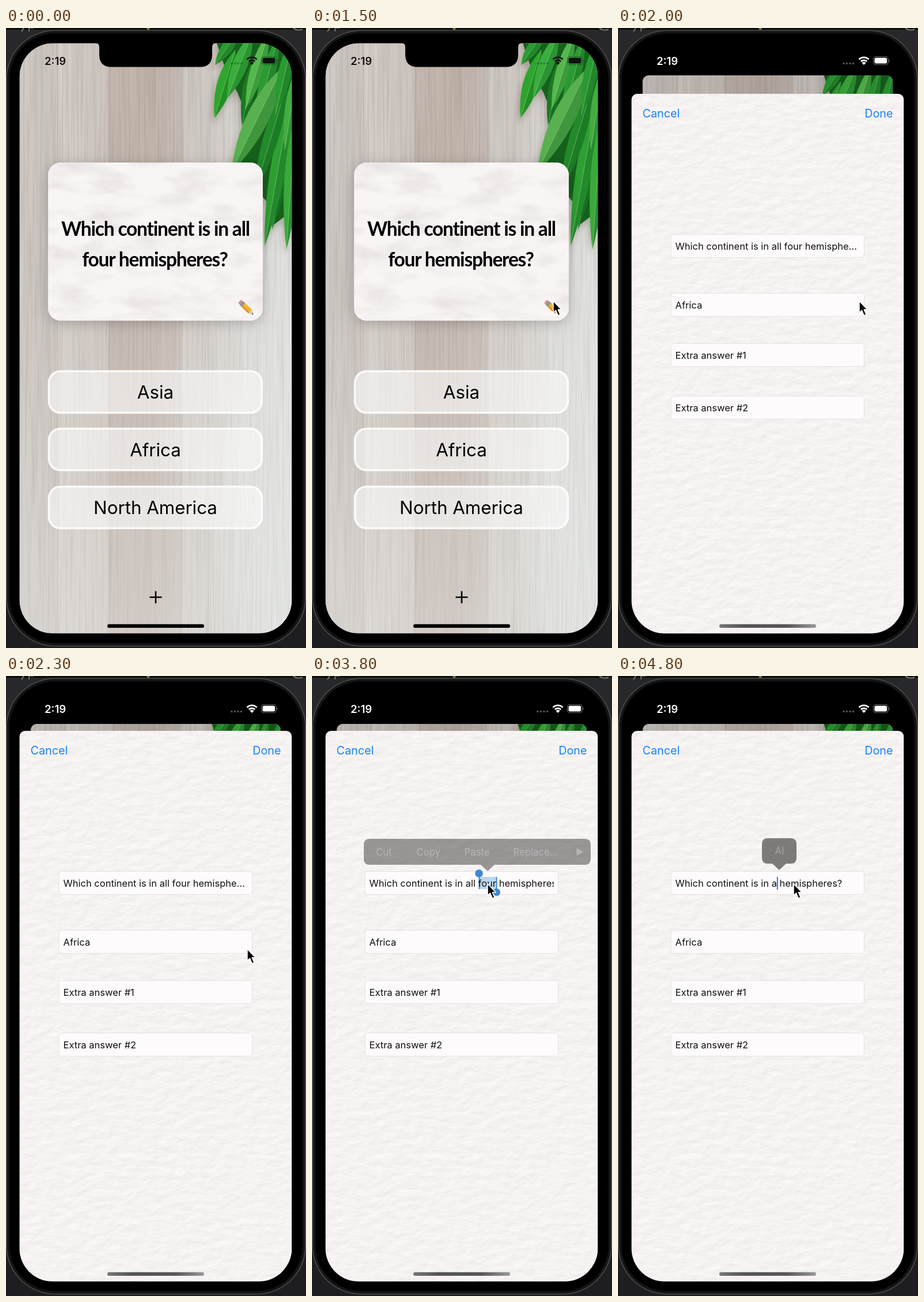
An HTML page that plays this animation: 521 by 1074 pixels, repeating every 5 s.

```html
<!DOCTYPE html>
<html lang="en">
<head>
<meta charset="utf-8">
<title>Flashcard app</title>
<style>
  html, body { margin: 0; width: 100%; height: 100%; overflow: hidden; background: #28282a; }
  svg { display: block; width: 100%; height: 100%; font-family: Inter, Roboto, sans-serif; }
  .question { font: 700 33.5px Lato, sans-serif; letter-spacing: -1.2px; text-anchor: middle; }
  .answer { font-size: 31.3px; text-anchor: middle; }
  .link { font-size: 19.8px; fill: #1a83f7; }
  .input { font-size: 16.5px; fill: #111; }
  .menu { font-size: 16.7px; fill: #fff; }
  .clock { font-size: 18.5px; font-weight: 600; }
</style>
</head>
<body>
<svg viewBox="0 0 521 1074" preserveAspectRatio="none">
  <defs>
    <clipPath id="glass"><rect x="23.3" y="26.3" width="473.2" height="1022.5" rx="57.5"/></clipPath>
    <clipPath id="homeClip"><rect id="homeShape" x="23.3" y="26.3" width="473.2" height="1022.5"/></clipPath>
    <clipPath id="sheetClip"><rect x="23.3" width="473.2" height="1100" rx="10"/></clipPath>
    <clipPath id="inputClip"><rect x="99" y="243" width="321" height="41"/></clipPath>
    <clipPath id="cardClip"><rect x="73" y="233" width="373" height="274" rx="22"/></clipPath>

    <linearGradient id="planks" gradientUnits="userSpaceOnUse" x1="23" x2="497" y1="0" y2="0">
      <stop offset="0" stop-color="#cfcbc7"/><stop offset=".13" stop-color="#cbc4bf"/>
      <stop offset=".15" stop-color="#d4cec9"/><stop offset=".325" stop-color="#cdc5bf"/>
      <stop offset=".33" stop-color="#c3b7af"/><stop offset=".48" stop-color="#c1b5ac"/>
      <stop offset=".592" stop-color="#c6bcb5"/><stop offset=".6" stop-color="#d0cac5"/>
      <stop offset=".7" stop-color="#d0cbc6"/><stop offset=".82" stop-color="#d9d8d5"/>
      <stop offset="1" stop-color="#dcdedc"/>
    </linearGradient>
    <linearGradient id="light" x1="0" y1="0" x2=".4" y2="1">
      <stop offset=".4" stop-color="#fff" stop-opacity="0"/>
      <stop offset="1" stop-color="#f4f8f7" stop-opacity=".35"/>
    </linearGradient>
    <linearGradient id="barTint">
      <stop offset="0" stop-color="#777"/><stop offset=".25" stop-color="#555"/>
      <stop offset=".7" stop-color="#595757"/><stop offset="1" stop-color="#999"/>
    </linearGradient>

    <filter id="grain" x="0" y="0" width="100%" height="100%" color-interpolation-filters="sRGB">
      <feTurbulence type="fractalNoise" baseFrequency=".3 .006" numOctaves="3" seed="4"/>
      <feColorMatrix values="0 0 0 0 .42  0 0 0 0 .36  0 0 0 0 .32  .35 0 0 0 -.13"/>
      <feComposite operator="over" in2="SourceGraphic"/>
    </filter>
    <filter id="marble" x="0" y="0" width="100%" height="100%" color-interpolation-filters="sRGB">
      <feTurbulence type="fractalNoise" baseFrequency=".014 .035" numOctaves="4" seed="9"/>
      <feColorMatrix values="0 0 0 0 .74  0 0 0 0 .71  0 0 0 0 .7  .6 0 0 0 -.25"/>
      <feComposite operator="over" in2="SourceGraphic"/>
    </filter>
    <filter id="paper" x="0" y="0" width="100%" height="100%" color-interpolation-filters="sRGB">
      <feTurbulence type="fractalNoise" baseFrequency=".045 .08" numOctaves="3" seed="2"/>
      <feDiffuseLighting surfaceScale=".28" diffuseConstant="1.155" lighting-color="#f6f2f2">
        <feDistantLight azimuth="240" elevation="60"/>
      </feDiffuseLighting>
    </filter>
    <filter id="shadow" x="-20%" y="-20%" width="140%" height="140%">
      <feDropShadow dx="0" dy="4" stdDeviation="11" flood-color="#000" flood-opacity=".22"/>
    </filter>
    <filter id="leafShadow" x="-20%" y="-20%" width="140%" height="140%">
      <feDropShadow dx="-3" dy="7" stdDeviation="6" flood-color="#3a2c20" flood-opacity=".3"/>
    </filter>
  </defs>

  <!-- desktop and phone body -->
  <rect width="521" height="1074" fill="#28282a"/>
  <rect y="965" width="521" height="109" fill="#1e1e20"/>
  <path d="M0 1.5H521" stroke="#0d0d0e" stroke-width="3"/>
  <path d="M27 6L32 -2M40 6V0H48" stroke="#8a8a8a" stroke-width="1.5" fill="none"/>
  <circle cx="247" cy="1" r="2.5" fill="#6f7d3c"/>
  <path d="M499 0Q506 6 515 2" stroke="#777" stroke-width="2" fill="none"/>
  <rect x="1" y="4.5" width="519" height="1066" rx="84" fill="#000" stroke="#48484a" stroke-width="2"/>
  <rect x="4" y="7.5" width="513" height="1060" rx="81" fill="none" stroke="#151516" stroke-width="4"/>

  <g clip-path="url(#glass)">
    <rect x="23" y="26" width="474" height="1023" fill="#000"/>
    <g id="home"><g clip-path="url(#homeClip)">
      <rect x="23" y="26" width="474" height="1023" fill="url(#planks)" filter="url(#grain)"/>
      <path d="M89.500 26V1049M180 26V1049M305.500 26V1049M351 500V1049" stroke="#8d8078" stroke-opacity=".25" stroke-width="1.500"/>
      <rect x="23" y="26" width="474" height="1023" fill="url(#light)"/>
      <g id="leaves" filter="url(#leafShadow)"></g>
      <g filter="url(#shadow)"><rect x="73" y="233" width="373" height="274" rx="22" fill="#f8f4f4"/></g>
      <g clip-path="url(#cardClip)"><rect x="73" y="233" width="373" height="274" fill="#f9f5f5" filter="url(#marble)"/></g>
      <text class="question" x="259.500" y="360">Which continent is in all</text>
      <text class="question" x="258.500" y="413">four hemispheres?</text>
      <g transform="translate(406 473) rotate(44)">
        <rect y="-3.500" width="5" height="8" rx="2" fill="#c98f8c"/>
        <rect x="4.500" y="-4" width="5" height="9" fill="#8f9494"/>
        <rect x="9.500" y="-4" width="16" height="9" fill="#f3b62d"/>
        <path d="M9.500 2H25.500V5H9.500Z" fill="#d9932a"/>
        <path d="M25.500 -4L33 .5L25.500 5Z" fill="#e3c8a0"/>
        <path d="M30.500 -1L33.500 .5L30.500 2Z" fill="#444"/>
      </g>
      <g id="answers"></g>
      <path d="M249.500 986H270.500M260 975.500V996.500" stroke="#000" stroke-width="2.600"/>
      <rect id="dim" x="23" y="26" width="474" height="1023"/>
    </g></g>

    <g id="sheet"><g clip-path="url(#sheetClip)">
      <rect x="23" width="474" height="960" fill="#f5f1f1" filter="url(#paper)"/>
      <text class="link" x="42.500" y="41">Cancel</text>
      <text class="link" x="477.500" y="41" text-anchor="end">Done</text>
      <g id="inputs"></g>
      <g id="selection">
        <rect x="290" y="253" width="31" height="21" fill="#bcd6ef"/>
        <path d="M290.500 249V274M320.500 253V279" stroke="#3f88d8" stroke-width="2"/>
        <circle cx="290" cy="247" r="6.800" fill="#3f88d8"/>
        <circle cx="320.500" cy="279.500" r="6.500" fill="#3f88d8"/>
      </g>
      <g clip-path="url(#inputClip)"><text id="typed" class="input" x="99.500" y="269.500"></text></g>
      <rect id="caret" y="253" width="2.200" height="22" fill="#3f88d8"/>
      <g id="menu">
        <path d="M100 187H474Q484 187 484 197V222Q484 232 474 232H317L305 243L293 232H100Q90 232 90 222V197Q90 187 100 187Z" fill="#2e2c2b"/>
        <g id="menuText" class="menu">
          <text x="111" y="215.500">Cut</text><text x="181.500" y="215.500">Copy</text>
          <text x="264.500" y="215.500">Paste</text><text x="349.500" y="215.500">Replace...</text>
          <path d="M459.500 203L471 209.500L459.500 216Z"/>
        </g>
      </g>
      <g id="hint">
        <path d="M260 186H300Q310 186 310 196V220Q310 230 300 230H292L280 241L268 230H260Q250 230 250 220V196Q250 186 260 186Z" fill="#2e2c2b" opacity=".6"/>
        <text class="menu" x="280.500" y="214" text-anchor="middle" opacity=".32">AI</text>
      </g>
    </g></g>
  </g>

  <path d="M156 26Q162 26.500 162 33V46Q162 67.500 183 67.500H337Q358 67.500 358 46V33Q358 26.500 364 26V24H156Z"/>
  <g id="status">
    <text class="clock" x="67" y="63.500">2:19</text>
    <g id="dots" opacity=".35"></g>
    <path d="M418.500 54.500A12 12 0 0 1 435.500 54.500M421.800 58A7.500 7.500 0 0 1 432.200 58" fill="none" stroke="currentColor" stroke-width="2.800"/>
    <path d="M427 64L423.500 60.300A5 5 0 0 1 430.500 60.300Z"/>
    <rect x="443.500" y="49.500" width="25.500" height="14" rx="4" fill="none" stroke="currentColor" stroke-opacity=".4" stroke-width="1.200"/>
    <rect x="445.500" y="51.500" width="21.500" height="10" rx="2.500"/>
    <path d="M470.500 54Q473 56.500 470.500 59Z" opacity=".5"/>
  </g>
  <rect id="bar" x="176" y="1032.800" width="168" height="6.200" rx="3.100"/>
  <path id="cursor" d="M0 0V20L4.500 16L8.200 25L12 23.400L8.300 14.800H14.200Z" stroke="#fff" stroke-width="1.500" stroke-linejoin="round"/>
</svg>
<script>
const LOOP = 5000;
const el = id => document.getElementById(id);
const show = (id, on) => el(id).setAttribute('display', on ? 'inline' : 'none');
const set = (id, name, value) => el(id).setAttribute(name, value);

// Latest entry whose start time has passed; motion holds between steps.
const pick = (steps, t) => steps.filter(s => s[0] <= t).pop();

// A blade from base to tip, bulging sideways, with a pale midrib.
function leaf([x0, y0, x1, y1, width, color]) {
  const len = Math.hypot(x1 - x0, y1 - y0);
  const nx = (y1 - y0) / len * width, ny = (x0 - x1) / len * width;
  const mx = x0 * .55 + x1 * .45, my = y0 * .55 + y1 * .45;
  const base = `M${x0} ${y0}Q`;
  return `<path d="${base}${mx + nx} ${my + ny} ${x1} ${y1}Q${mx - nx} ${my - ny} ${x0} ${y0}Z" fill="${color}"/>
    <path d="${base}${mx + nx} ${my + ny} ${x1} ${y1}Q${mx} ${my} ${x0} ${y0}Z" fill="#0b5a18" opacity=".3"/>
    <path d="${base}${mx} ${my} ${x1} ${y1}" fill="none" stroke="#b4e39c" stroke-opacity=".45"/>`;
}

el('leaves').innerHTML =
  '<path d="M364 20H500V345L486 325L466 340L452 300L398 236L424 165L402 112L384 80Z" fill="#12601b"/>' + [
    [404, 5, 363, 64, 20, '#2c9a33'],
    [398, 38, 362, 156, 27, '#2fa52f'],
    [428, 8, 384, 122, 26, '#3aad3c'],
    [432, 50, 410, 170, 22, '#1a7a24'],
    [456, 8, 416, 140, 24, '#55b84e'],
    [474, 10, 432, 172, 24, '#2c9a33'],
    [500, 140, 462, 350, 22, '#1a7a24'],
    [496, 110, 449, 378, 27, '#2f9f33'],
    [503, 150, 487, 384, 24, '#3aa83a'],
    [490, 90, 430, 290, 26, '#238a2b'],
    [480, 68, 391, 250, 38, '#58b04f'],
    [500, 10, 468, 150, 24, '#2c9a33'],
    [508, 60, 484, 210, 22, '#45ac42']
  ].map(leaf).join('');

el('answers').innerHTML = [['Asia', 593], ['Africa', 692.5], ['North America', 793]].map(([label, y]) =>
  `<rect x="74.500" y="${y + 1.5}" width="370" height="72" rx="20" fill="#fff" fill-opacity=".56"
     stroke="#fff" stroke-opacity=".88" stroke-width="3.500"/>
   <text class="answer" x="259.500" y="${y + 49}">${label}</text>`).join('');

el('inputs').innerHTML = [['', 243], ['Africa', 345], ['Extra answer #1', 432], ['Extra answer #2', 523]].map(([label, y]) =>
  `<rect x="92" y="${y + .5}" width="335.500" height="40" rx="5" fill="#fdfbfc" stroke="#e6e1e1"/>
   <text class="input" x="99.500" y="${y + 26.5}">${label}</text>`).join('');

el('dots').innerHTML = [392, 397.5, 403, 408.5].map(x => `<circle cx="${x}" cy="61.500" r="1.700"/>`).join('');

// [time, x, y]
const cursorSteps = [
  [800, 470, 373], [1000, 446, 428], [1300, 423, 470], [1500, 419, 473],
  [2500, 330, 391], [2800, 244, 362], [3000, 305, 360]
];
// [time, sheet top, scale, back view top, corner radius, dimming]
const sheetSteps = [
  [0, 1100, 1, 26.3, 57.5, 0], [1800, 780, .977, 42.5, 42, .05],
  [2000, 114, .9185, 82, 11, .09], [2300, 95, .9175, 83, 11, .1]
];
// [time, box opacity, label opacity]
const menuSteps = [[0, 0, 0], [3800, .47, .3], [4000, .92, .9], [4300, 1, 1], [4500, 0, 0]];
const tail = ' hemispheres?', stem = 'Which continent is in ';
// [time, text, caret x]
const textSteps = [
  [0, stem + 'all four hemisphe...', 0], [3800, stem + 'all four' + tail, 0],
  [4500, stem + 'all' + tail, 284.5], [4800, stem + 'a' + tail, 275.8]
];

function draw(t) {
  const [, top, scale, backTop, radius, dim] = pick(sheetSteps, t);
  set('home', 'transform', `translate(${260 * (1 - scale)} ${backTop - 26.3 * scale}) scale(${scale})`);
  set('homeShape', 'rx', radius / scale);
  set('dim', 'opacity', dim);
  set('answers', 'opacity', t < 1800 ? 1 : .82);
  set('sheet', 'transform', `translate(0 ${top})`);
  show('sheet', t >= 1800);

  const ink = t < 2000 ? '#111' : '#fff';
  set('status', 'fill', ink);
  set('status', 'color', ink);
  set('bar', 'fill', t < 1800 ? '#000' : 'url(#barTint)');

  const [, text, caretX] = pick(textSteps, t);
  el('typed').textContent = text;
  set('caret', 'x', caretX);
  show('caret', caretX > 0);
  show('selection', t >= 3800 && t < 4500);
  show('hint', t >= 4800);

  const [, box, label] = pick(menuSteps, t);
  show('menu', box > 0);
  el('menu').firstElementChild.setAttribute('opacity', box);
  set('menuText', 'opacity', label);

  const spot = pick(cursorSteps, t);
  show('cursor', spot);
  if (spot) set('cursor', 'transform', `translate(${spot[1]} ${spot[2]})`);
}

// Redraw only when a step begins.
const times = [...new Set([cursorSteps, sheetSteps, menuSteps, textSteps].flat().map(s => s[0]))].sort((a, b) => a - b);
let shown = -1;
function tick() {
  const t = performance.now() % LOOP;
  const step = times.filter(s => s <= t).pop();
  if (step !== shown) draw(shown = step);
  requestAnimationFrame(tick);
}
tick();
</script>
</body>
</html>
```
